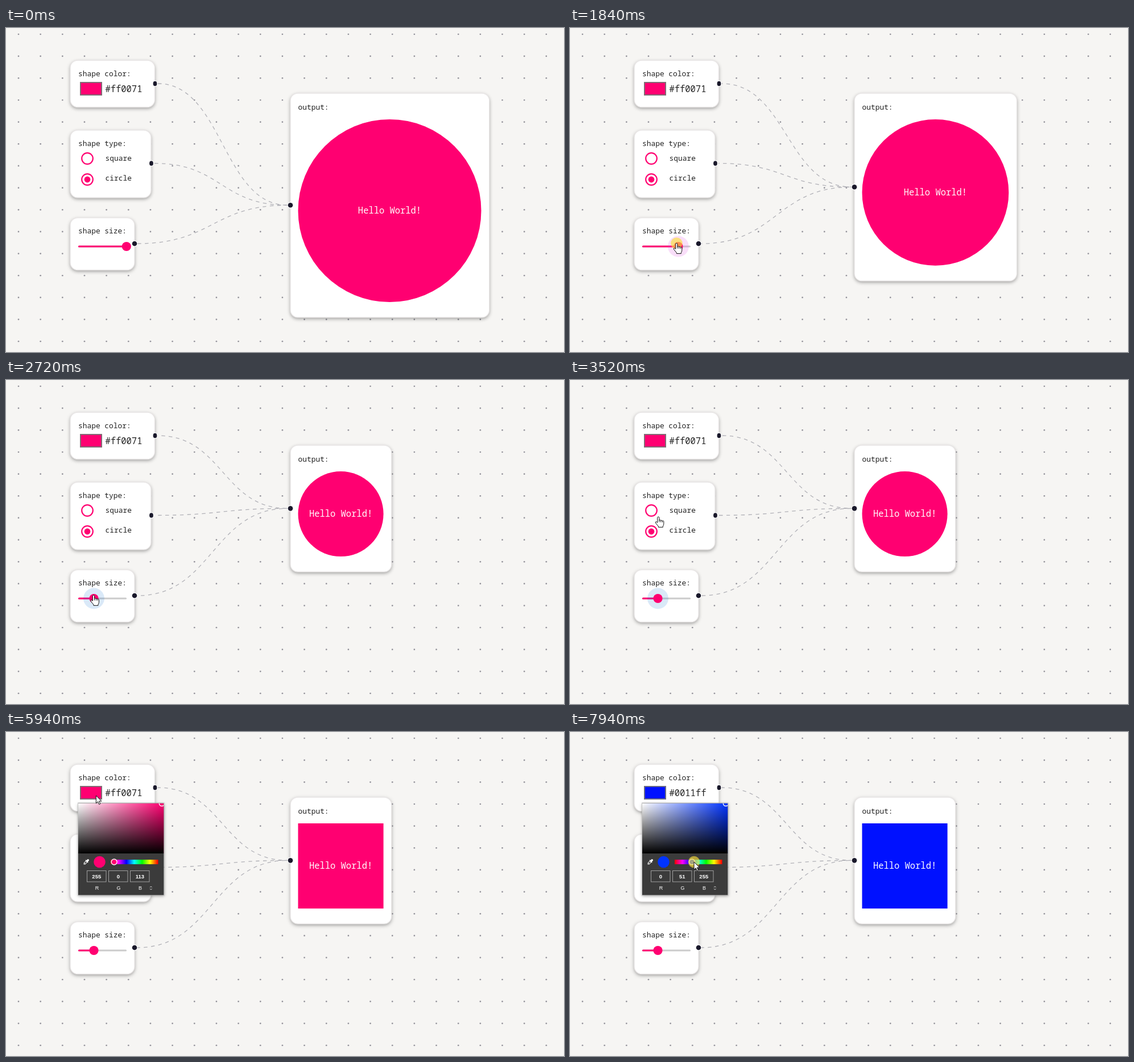
Write an HTML page with a canvas that moves like this. It is 981 by 571 pixels and loops after 8000 ms.

```html
<!DOCTYPE html>
<html lang="en">
<head>
<meta charset="utf-8">
<title>Shape nodes</title>
<style>
  html, body { margin: 0; width: 100%; height: 100%; overflow: hidden; background: #f6f5f3; }
  canvas { display: block; width: 981px; height: 571px; }
</style>
</head>
<body>
<canvas id="stage"></canvas>
<script>
const W = 981, H = 571, LOOP = 8000, STEP = LOOP / 120, ZOOM = 1.2887;
const PINK = '#ff0071', INK = '#1a192b', TEXT = '#222';
const MONO = '"Noto Sans Mono", monospace', SANS = '"Liberation Sans", sans-serif';
const SMALL = 10 * ZOOM, LARGE = 12 * ZOOM;
const START_HUE = 360 - 113 / 255 * 60, END_HUE = 228;
const DRAG_HUE = [7680, 119 * STEP];
const RADIO_CLICK = 3980, POPUP_OPEN = 5520;

// Pointer tip: time, x, y
const TRAIL = [
  [66, 745, 538], [350, 588, 490], [680, 177, 386], [840, 184, 386], [1130, 197, 383],
  [1380, 199, 382], [1720, 190.5, 380], [2240, 170.4, 377], [2580, 153.5, 378],
  [2660, 151.5, 379], [2850, 158, 380], [3200, 168, 288], [3520, 156, 242],
  [3750, 146, 232], [4350, 145, 231], [4800, 155, 165], [5060, 160, 123],
  [5300, 153, 108], [5800, 153, 108], [6000, 161, 114], [6500, 196, 170],
  [6940, 201, 205], [7300, 195, 228], [7670, 194, 229], [7933, 218, 229]
];
const PRESSES = [[1300, 2640], [3880, 4100], [5350, 5500], [7640, LOOP]];

const HAND = new Path2D('M-1.7 10V1.3a1.6 1.6 0 0 1 3.2 0V6.4a1.4 1.4 0 0 1 2.8 .3a1.4 1.4 0 0 1 2.7 .5' +
  'a1.3 1.3 0 0 1 2.4 .7V12q0 2.5-1.5 4.3V18H0V16.6L-4.8 10.6q-1.1-2 .5-2.3q1-.2 2.6 1.7z');
const HAND_LINES = new Path2D('M1.5 6.4V9M4.3 6.7V9.2M7 7.2V9.4');
const ARROW = new Path2D('M0 0V13.6L3.2 10.7L5.3 15.6L7.5 14.6L5.4 9.9H9.7Z');

const canvas = document.getElementById('stage');
const ctx = canvas.getContext('2d');
const dpr = window.devicePixelRatio || 1;
canvas.width = W * dpr;
canvas.height = H * dpr;

const clamp = (v, lo, hi) => Math.min(hi, Math.max(lo, v));
const progress = (t, a, b) => clamp((t - a) / (b - a), 0, 1);
const mix = (a, b, k) => a + (b - a) * k;

function pointerAt(t) {
  let i = 1;
  while (i < TRAIL.length - 1 && TRAIL[i][0] < t) i++;
  const a = TRAIL[i - 1], b = TRAIL[i], k = progress(t, a[0], b[0]);
  return { x: mix(a[1], b[1], k), y: mix(a[2], b[2], k) };
}

function thumbAt(t) {
  return t < 1420 ? 211.8 : Math.max(154.5, pointerAt(Math.min(t, 2660)).x + 3);
}

const hueAt = t => mix(START_HUE, END_HUE, progress(t, ...DRAG_HUE));

function hueToRgb(h) {
  const channel = shift => {
    const d = Math.abs(((h - shift + 540) % 360) - 180);
    return Math.round(255 * clamp(2 - d / 60, 0, 1));
  };
  return [channel(0), channel(120), channel(240)];
}
const toHex = rgb => '#' + rgb.map(c => c.toString(16).padStart(2, '0')).join('');

function ellipse(x, y, rx, ry, fill) {
  ctx.beginPath();
  ctx.ellipse(x, y, rx, ry, 0, 0, Math.PI * 2);
  ctx.fillStyle = fill;
  ctx.fill();
}
const disc = (x, y, r, fill) => ellipse(x, y, r, r, fill);

function ring(x, y, r, color, width) {
  ctx.beginPath();
  ctx.arc(x, y, r, 0, Math.PI * 2);
  ctx.strokeStyle = color;
  ctx.lineWidth = width;
  ctx.stroke();
}

function line(x1, x2, y, color, width) {
  ctx.beginPath();
  ctx.moveTo(x1, y);
  ctx.lineTo(x2, y);
  ctx.strokeStyle = color;
  ctx.lineWidth = width;
  ctx.lineCap = 'round';
  ctx.stroke();
  ctx.lineCap = 'butt';
}

function label(text, x, y, size = SMALL, color = TEXT, align = 'left', family = MONO, weight = 500) {
  ctx.font = `${weight} ${size}px ${family}`;
  ctx.textAlign = align;
  ctx.fillStyle = color;
  ctx.fillText(text, x, y);
}

function withShadow(color, blur, dy, draw) {
  ctx.save();
  ctx.shadowColor = color;
  ctx.shadowBlur = blur * dpr;
  ctx.shadowOffsetY = dy * dpr;
  draw();
  ctx.restore();
}

function card(x, y, w, h) {
  ctx.beginPath();
  ctx.roundRect(x, y, w, h, 13);
  ctx.fillStyle = '#fff';
  withShadow('rgba(0,0,0,.38)', 6, 2.5, () => ctx.fill());
  ctx.strokeStyle = '#e9e6e6';
  ctx.lineWidth = 1.3;
  ctx.stroke();
}

function handle(x, y, rx = 4.3) {
  ellipse(x, y, rx + 1.2, 5.5, '#fff');
  ellipse(x, y, rx, 4.3, INK);
}

function dots() {
  const gap = 30 * ZOOM;
  for (let x = 22; x < W; x += gap)
    for (let y = 11; y < H; y += gap) disc(x, y, 1.35, '#93929a');
}

function edge(x, y, endY, t) {
  const endX = 495, mid = (x + endX) / 2, dash = 5 * ZOOM;
  ctx.save();
  ctx.setLineDash([dash, dash]);
  ctx.lineDashOffset = 2 * dash * (1 - (t % 500) / 500);
  ctx.strokeStyle = '#b1b1b7';
  ctx.lineWidth = ZOOM;
  ctx.beginPath();
  ctx.moveTo(x, y);
  ctx.bezierCurveTo(mid, y, mid, endY, endX, endY);
  ctx.stroke();
  ctx.restore();
}

function colorNode(hex) {
  card(113, 57, 148.5, 82.5);
  label('shape color:', 127, 85.3);
  ctx.fillStyle = hex;
  ctx.fillRect(130, 95, 39, 24);
  ctx.strokeStyle = 'rgba(118,118,118,.9)';
  ctx.lineWidth = 2;
  ctx.strokeRect(131, 96, 37, 22);
  label(hex, 174.5, 113, LARGE, TEXT, 'left', MONO, 400);
  handle(262, 98, 3.4);
}

function radio(y, fill) {
  ring(143, y, 9.8, PINK, 2.2);
  if (fill > 0) disc(143, y, 5.4 * fill, PINK);
}

function typeNode(t) {
  card(113, 180, 142, 119);
  label('shape type:', 127, 207.5);
  const k = progress(t, RADIO_CLICK, RADIO_CLICK + 130);
  radio(230, k);
  radio(267, 1 - k);
  label('square', 174.5, 234);
  label('circle', 174.5, 269);
  handle(255.5, 238.5, 3.4);
}

function sizeNode(t, thumb) {
  card(113, 334.5, 113, 92);
  label('shape size:', 127, 362.3);
  line(128.5, 210.5, 385, '#cbcbcb', 3.2);
  line(128.5, thumb, 385, PINK, 3.2);
  if (t >= 1300 && t < 2660) disc(thumb, 385, 18.5, 'rgba(225,90,225,.2)');
  else if (t >= 2660) {
    const alpha = 0.16 * (1 - progress(t, RADIO_CLICK - 60, RADIO_CLICK + 90));
    disc(thumb, 385, 18.5, `rgba(25,118,210,${alpha})`);
  }
  disc(thumb, 385, 8.1, PINK);
  handle(226, 380);
}

function outputNode(t, size, hex, portY) {
  card(500, 115, size + 27.7, size + 73);
  label('output:', 513.5, 143.5);
  const r = size / 2, cx = 513.5 + r, cy = 161 + r;
  if (t < RADIO_CLICK) disc(cx, cy, r, hex);
  else {
    ctx.fillStyle = hex;
    ctx.fillRect(513.5, 161, size, size);
  }
  label('Hello World!', cx, cy + 4.8, LARGE, '#fff', 'center', MONO, 400);
  handle(500, portY);
}

function shade(x0, y0, x1, y1, stops) {
  const g = ctx.createLinearGradient(x0, y0, x1, y1);
  stops.forEach((c, i) => g.addColorStop(i / (stops.length - 1), c));
  return g;
}

function dropper() {
  ctx.save();
  ctx.translate(141, 229);
  ctx.rotate(Math.PI / 4);
  ctx.strokeStyle = ctx.fillStyle = '#fff';
  ctx.lineWidth = 1;
  ctx.beginPath();
  ctx.roundRect(-1.7, -6.2, 3.4, 4.5, 1.5);
  ctx.rect(-3, -2.2, 6, 1.3);
  ctx.fill();
  ctx.strokeRect(-1.4, -1, 2.8, 5.2);
  ctx.fillRect(-0.6, 4.4, 1.2, 1.8);
  ctx.restore();
}

function picker(hue) {
  const x = 127, y = 125.5, w = 150.5, rgb = hueToRgb(hue), hex = toHex(rgb);
  ctx.fillStyle = '#3b3b3b';
  withShadow('rgba(0,0,0,.4)', 5, 1.5, () => ctx.fillRect(x, y, w, 162));

  ctx.save();
  ctx.beginPath();
  ctx.rect(x, y, w, 88.5);
  ctx.clip();
  for (const fill of [shade(x, 0, x + w, 0, ['#fff', hex]),
                      shade(0, y, 0, y + 88.5, ['rgba(0,0,0,0)', '#000'])]) {
    ctx.fillStyle = fill;
    ctx.fillRect(x, y, w, 88.5);
  }
  ring(274, 126, 4.6, '#fff', 1.5);
  ctx.restore();

  dropper();
  disc(164.5, 229, 10.3, hex);
  ctx.fillStyle = shade(184, 0, 267, 0, ['#f00', '#f0f', '#00f', '#0ff', '#0f0', '#ff0', '#f00']);
  ctx.fillRect(184, 225, 83.5, 8);
  const knob = 184 + (360 - hue) / 360 * 83;
  disc(knob, 229, 5, hex);
  ring(knob, 229, 5, '#fff', 1.4);

  rgb.forEach((value, i) => {
    const cx = 159.3 + i * 38;
    ctx.strokeStyle = '#a0a0a0';
    ctx.lineWidth = 1;
    ctx.strokeRect(cx - 16.8, 244.5, 33.5, 19.5);
    label(value, cx, 257.8, 9.5, '#fff', 'center', SANS, 700);
    label('RGB'[i], cx + 0.7, 278, 9, '#fff', 'center', SANS, 400);
  });
  ctx.strokeStyle = '#ddd';
  ctx.stroke(new Path2D('M253 273.8L254.8 272L256.6 273.8M253 276.2L254.8 278L256.6 276.2'));
  ctx.strokeStyle = 'rgba(190,190,190,.8)';
  ctx.strokeRect(x - 0.5, y - 0.5, w + 1, 163);
}

function pointer(t) {
  if (t < TRAIL[0][0]) return;
  const { x, y } = pointerAt(t);
  if (PRESSES.some(([a, b]) => t >= a && t < b)) disc(x, y, 10.3, 'rgba(250,222,60,.65)');
  const isHand = t > 560 && t < 4600;
  ctx.save();
  ctx.translate(x, y);
  ctx.fillStyle = '#fff';
  ctx.strokeStyle = '#111';
  ctx.lineWidth = 1;
  ctx.lineJoin = 'round';
  ctx.fill(isHand ? HAND : ARROW);
  ctx.stroke(isHand ? HAND : ARROW);
  if (isHand) ctx.stroke(HAND_LINES);
  ctx.restore();
}

function draw(t) {
  ctx.setTransform(dpr, 0, 0, dpr, 0, 0);
  ctx.fillStyle = '#f6f5f3';
  ctx.fillRect(0, 0, W, H);

  const thumb = thumbAt(t);
  const size = 322 - (211.8 - thumb) * 3;
  const portY = 115 + (size + 73) / 2 - 0.2;
  const hex = toHex(hueToRgb(hueAt(t - 19.2)));

  dots();
  edge(267, 98, portY, t);
  edge(261, 238.5, portY, t);
  edge(231, 380, portY, t);
  colorNode(hex);
  typeNode(t);
  sizeNode(t, thumb);
  outputNode(t, size, hex, portY);
  if (t >= POPUP_OPEN) picker(hueAt(t));
  pointer(t);
}

const begin = performance.now();
function tick() {
  const t = (performance.now() - begin) % LOOP;
  draw(Math.min(119, Math.floor((t + 15) / STEP)) * STEP);
  requestAnimationFrame(tick);
}
tick();
</script>
</body>
</html>
```
